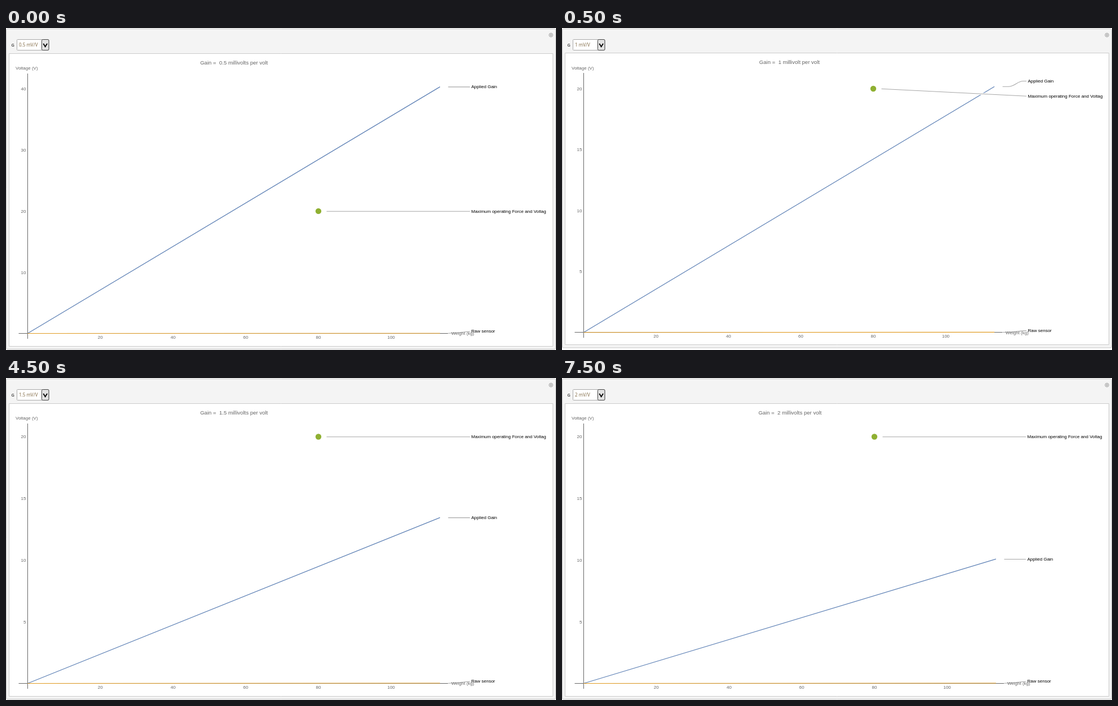
An HTML page with a canvas for the animation above (8000 ms loop, 977 by 573 pixels).

```html
<!DOCTYPE html>
<html lang="en">
<head>
<meta charset="utf-8">
<title>Sensor gain</title>
<style>
  html, body { margin: 0; width: 100%; height: 100%; overflow: hidden; background: #fff; }
  canvas { display: block; }
</style>
</head>
<body>
<canvas id="stage" width="977" height="573"></canvas>
<script>
const ctx = document.getElementById('stage').getContext('2d');
const LOOP = 8000, MAX_WEIGHT = 113.45, GRAY = '#666', LEADER = '#a6a6a6';
const SANS = '"Liberation Sans", Arial, sans-serif', UI = '"Noto Sans", "Open Sans", sans-serif';

const tall = { bottom: 571.5, top: 45.5, plotBottom: 566.5, originY: 543.5, scaleX: 6.457,
  axisTop: 81, labelX: 826.5, titleX: 405, titleY: 61.6, nameY: 71.6 };
const short = { bottom: 569, top: 44.5, plotBottom: 563.5, originY: 541.8, scaleX: 6.432,
  axisTop: 80, labelX: 827.5, titleX: 404, titleY: 60.9, nameY: 70.8 };
const scenes = [
  { start: 0, gain: 0.5, step: 10, scaleY: 10.88, box: tall },
  { start: 500, gain: 1, step: 5, scaleY: 21.69, box: short, gainLabelY: 94, maxLabelY: 121 },
  { start: 4500, gain: 1.5, step: 5, scaleY: 21.95, box: tall },
  { start: 7500, gain: 2, step: 5, scaleY: 21.95, box: tall }
];

// y is the middle of the capital letters
function text(value, x, y, { size = 8, color = GRAY, align = 'left', family = SANS } = {}) {
  ctx.font = `${size}px ${family}`;
  ctx.textAlign = align;
  ctx.fillStyle = color;
  ctx.fillText(value, x, y + size * 0.36);
}

function stroke(path, color, width = 1) {
  ctx.strokeStyle = color;
  ctx.lineWidth = width;
  ctx.stroke(new Path2D(path));
}

// Leaders have a white halo that cuts through the curves
function leader(path) {
  stroke(path, '#fff', 3.5);
  stroke(path, LEADER, 1.1);
}

function box(x, y, right, bottom, radius, fill, border) {
  ctx.beginPath();
  ctx.roundRect(x, y, right - x, bottom - y, radius);
  ctx.fillStyle = fill;
  ctx.fill();
  ctx.strokeStyle = border;
  ctx.lineWidth = 1;
  ctx.stroke();
}

function drawPanel({ gain, box: b }) {
  box(0.5, 1.5, 976.5, b.bottom, 2, '#f4f4f4', '#c4c4c4');
  box(5.5, b.top, 971.5, b.plotBottom, 0, '#fff', '#cbcbcb');
  ctx.beginPath();
  ctx.arc(968, 12.5, 3.3, 0, 7);
  ctx.strokeStyle = '#999';
  ctx.stroke();
  stroke('M966 12.5H970M968 10.5V14.5', '#999');
  text('G', 9.5, 30.4, { size: 7.2, color: '#000', family: UI });
  box(19.5, 20.5, 76, 39.5, 1, '#fff', '#aaa');
  text(`${gain} mV/V`, 23, 30.4, { color: '#86704c', family: UI });
  box(63.5, 20.5, 76, 39.5, 2, '#e3e3e3', '#444');
  stroke('M66.3 27.8L69.7 33.3L73.1 27.8', '#000', 1.8);
}

function drawPlot({ gain, step, scaleY, box: b, gainLabelY, maxLabelY }) {
  const px = weight => 38.4 + weight * b.scaleX;
  const py = volts => b.originY - volts * scaleY;
  const endX = px(MAX_WEIGHT), endY = py(20.17 / gain), base = b.originY;
  const leaderX = endX + 14.5, labelEnd = b.labelX - 2.5;

  text(`Gain =  ${gain} millivolt${gain === 1 ? '' : 's'} per volt`, b.titleX, b.titleY,
    { size: 9.6, align: 'center' });
  text('Voltage (V)', 17, b.nameY);
  for (let w = 20; w <= 100; w += 20) text(w, px(w), base + 6.5, { align: 'center' });
  for (let n = 1; n * step <= (gain < 1 ? 40 : 20); n++)
    text(n * step, 35.5, py(n * step), { align: 'right' });

  stroke(`M22.5 ${Math.floor(base) + 0.5}H${leaderX}M38.5 ${b.axisTop}V${base + 9.5}`, GRAY);
  stroke(`M38.4 ${base}L${endX} ${endY}`, '#5e81b5', 1.25);
  stroke(`M38.4 ${base}L${endX} ${py(0.02)}`, '#e19c24', 1.1);

  ctx.beginPath();
  ctx.arc(px(80), py(20), 5.2, 0, 7);
  ctx.fillStyle = '#8fb032';
  ctx.fill();

  const gainY = gainLabelY ?? endY, maxY = maxLabelY ?? py(20);
  leader(gainLabelY
    ? `M${leaderX} ${endY}H793C804 ${endY} 809 ${gainY + 0.5} 819 ${gainY + 0.5}H${labelEnd}`
    : `M${leaderX} ${endY + 0.3}H${labelEnd}`);
  leader(`M${px(80) + 14.5} ${py(20) + 0.3}L${labelEnd} ${maxY + 0.3}`);
  leader(`M${leaderX} ${base - 0.3}C802 ${base - 0.3} 812 ${base - 3} ${labelEnd} ${base - 3.2}`);
  text('Weight (kg)', leaderX + 5.5, base);

  ctx.save();
  ctx.beginPath();
  ctx.rect(0, 0, 960.5, 573);
  ctx.clip();
  const black = { color: '#000' };
  text('Applied Gain', b.labelX, gainY - 0.1, black);
  text('Maximum operating Force and Voltag', b.labelX, maxY - 0.1, black);
  text('Raw sensor', b.labelX, base - 3.9, black);
  ctx.restore();
}

function render() {
  const time = performance.now() % LOOP;
  const scene = scenes.findLast(s => s.start <= time);
  ctx.clearRect(0, 0, 977, 573);
  drawPanel(scene);
  drawPlot(scene);
  requestAnimationFrame(render);
}
render();
</script>
</body>
</html>
```
